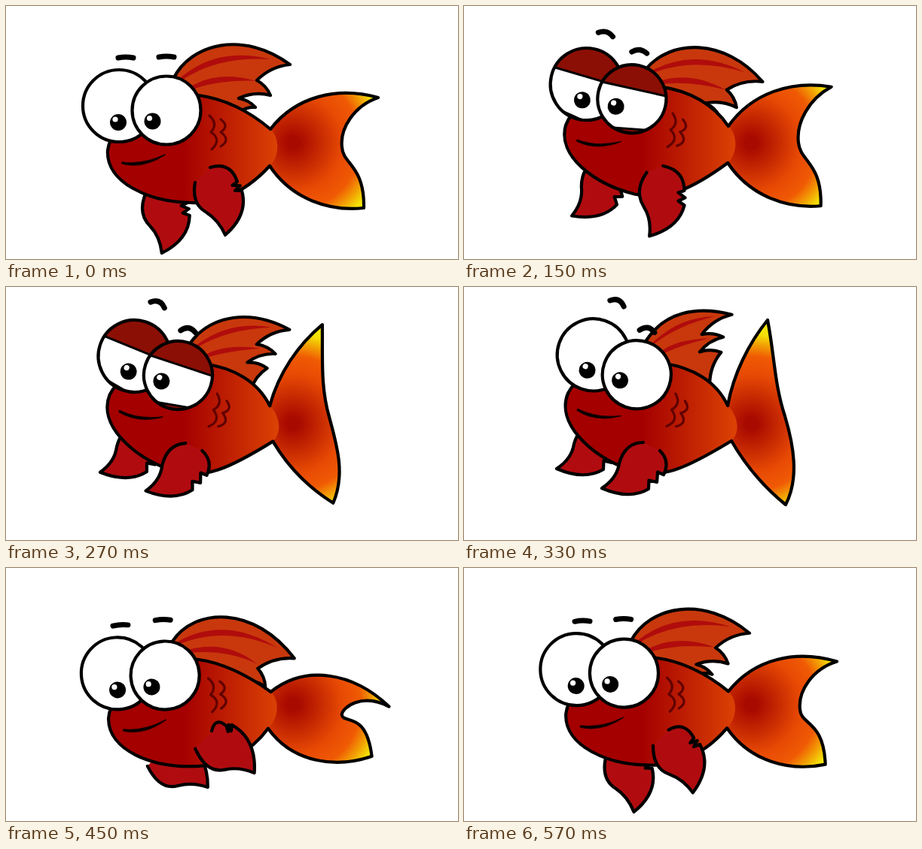
An HTML page for the animation above (600 ms loop, 600 by 337 pixels).

```html
<!DOCTYPE html>
<html lang="en">
<head>
<meta charset="utf-8">
<title>Swimming fish</title>
<style>
  html, body { margin: 0; width: 100%; height: 100%; overflow: hidden; background: #fff; }
  svg { display: block; width: 100%; height: 100%; }
  .ink { stroke: #000; stroke-width: 4.2; stroke-linejoin: round; stroke-linecap: round; }
  .line { fill: none; }
  .fin { fill: #b00c10; }
  .brow { fill: none; stroke-width: 7; }
  .lid { fill: #8c0f05; }
  .lid-edge { fill: none; stroke: #000; stroke-width: 3; }
</style>
</head>
<body>
<svg viewBox="0 0 600 337" preserveAspectRatio="xMidYMid meet">
  <defs>
    <linearGradient id="bodyFill" gradientUnits="userSpaceOnUse" x1="236" x2="362" y1="0" y2="0">
      <stop offset="0" stop-color="#a40000"/>
      <stop offset="1" stop-color="#dc4204"/>
    </linearGradient>
    <radialGradient id="tailFill" gradientUnits="userSpaceOnUse" cx="381" cy="182" r="140">
      <stop offset=".06" stop-color="#a80a00"/>
      <stop offset=".47" stop-color="#e84a04"/>
      <stop offset=".64" stop-color="#f05a04"/>
      <stop offset=".76" stop-color="#f2a304"/>
      <stop offset=".85" stop-color="#f4e008"/>
      <stop offset="1" stop-color="#f5f008"/>
    </radialGradient>
  </defs>
  <path id="backFin" class="ink fin"/>
  <g class="turning">
    <path id="dorsal" class="ink" fill="#c8380c"/>
    <path id="stripes" fill="#b00c0c"/>
  </g>
  <path id="tail" class="ink" fill="url(#tailFill)"/>
  <path id="bodyShape" fill="url(#bodyFill)"/>
  <path id="bodyLine" class="ink line"/>
  <path id="frontFin" class="ink fin"/>
  <g id="head" class="turning">
    <path d="M270 146Q282 157 272 168Q287 178 273 191M285 151Q297 160 285 168Q299 178 285 187"
      fill="none" stroke="#600000" stroke-width="3.2" stroke-linecap="round" stroke-linejoin="round"/>
    <path d="M154 208Q182 212 211 198Q182 217 154 210Z" stroke="#1a0000" stroke-width="1.5" stroke-linejoin="round"/>
  </g>
  <path id="leftBrow" class="ink brow"/>
  <path id="rightBrow" class="ink brow"/>
</svg>
<script>
const LOOP = 600, STEP = 30;
const KEY_TIMES = [0, 90, 210, 330, 390, 450, 570];

// How far each part has moved from rest (0) to its folded pose (1).
const motion = {
  lift:     [0, .386, .86, 1, .27, -.16, -.045],
  tailTop:  [0, -.21, .55, 1, -.18, -.52, -.02],
  tailLow:  [0, -.35, .56, 1, .15, -.39, -.16],
  crest:    [0, -.1, .19, 1, -.04, -.5, -.11],
  frontFin: [0, -.06, .89, 1, .01, -.52, -.14],
  backFin:  [.22, .58, .92, 1, .1, -.56, .03]
};

// Rest and folded outlines, relative to the pivot of each part.
const tail = {
  topRest:   [0,-24, 34,-68, 89,-81, 143,-66, 111,-55, 92,-25, 95,0],
  topFolded: [-1,-24, 7,-67, 27,-107, 52,-138, 61,-92, 61,-52, 75,-10],
  lowRest:   [96,23, 125,24, 124,81, 79,86, 29,70, -1,25],
  lowFolded: [87,30, 94,73, 76,108, 49,86, 24,58, 4,23]
};
const dorsal = {
  rest:   [-25,-29, -2,-76, 68,-94, 130,-48, 86,-27, 104,-7, 62,-3, 84,9, 65,14],
  folded: [-38,-30, -28,-79, 12,-100, 59,-104, 30,-66, 58,-72, 35,-43, 62,-52, 62,-6]
};
const fin = {
  rest:   [4,-26, 31,-34, 40,-7, 46,5, 55,37, 24,64, 15,44, -1,34, -21,23, -16,-6],
  folded: [1,-11, 15,3, 6,21, -14,40, -39,55, -76,39, -56,26, -53,6, -45,-22, -21,-22]
};
const body = {
  back: [325,142, 292,124, 256,119],
  face: [215,112, 140,150, 135,192, 132,235, 190,261, 245,262],
  belly: [285,263, 320,246]
};

// upper and lower: heights of the crossing lid edges at x = -60 and x = 60
const eyes = [
  { x: 150, y: 133, r: 48, pupil: [-1, 22], upper: [24, 32], lower: [12, 37] },
  { x: 213, y: 139, r: 45.5, pupil: [-18.5, 14.5], upper: [24, 24], lower: [27, 9] }
];
const brows = [
  { id: 'leftBrow', x: 159, y: 69, dx: 44, dy: -47, turn: 24 },
  { id: 'rightBrow', x: 213, y: 68, dx: 30, dy: -9, turn: 9 }
];
const HEAD_TURN = 19.2, HEAD_X = 287, HEAD_Y = 176;

const el = id => document.getElementById(id);
const draw = (id, d) => el(id).setAttribute('d', d);
const mix = (a, b, k) => a + (b - a) * k;
const clamp = v => Math.min(1, Math.max(0, v));

const SIZES = { M: 2, L: 2, Q: 4, C: 6 };
function path(commands, nums) {
  let i = 0;
  return [...commands].map(c => c + nums.slice(i, i += SIZES[c]).map(n => n.toFixed(2)).join(' ')).join('');
}

const mapPoints = (nums, fn) =>
  nums.flatMap((x, i) => i % 2 ? [] : fn(x, nums[i + 1], i));
const shift = (nums, dx, dy) => mapPoints(nums, (x, y) => [x + dx, y + dy]);
function rotate(nums, degrees, cx = 0, cy = 0) {
  const a = degrees * Math.PI / 180, c = Math.cos(a), s = Math.sin(a);
  return mapPoints(nums, (x, y) => [cx + (x - cx) * c - (y - cy) * s, cy + (x - cx) * s + (y - cy) * c]);
}

// Swings every point around the pivot; beyond rest only the angle goes on.
function swing(rest, folded, k) {
  return mapPoints(rest, (x, y, i) => {
    const from = Math.atan2(y, x);
    let turn = Math.atan2(folded[i + 1], folded[i]) - from;
    turn = Math.atan2(Math.sin(turn), Math.cos(turn));
    const r = mix(Math.hypot(x, y), Math.hypot(folded[i], folded[i + 1]), Math.max(0, k));
    return [r * Math.cos(from + turn * k), r * Math.sin(from + turn * k)];
  });
}

// Smooth cyclic interpolation without overshoot.
function sample(keys, t) {
  const n = keys.length;
  const wrap = i => (i + n) % n;
  const span = i => (KEY_TIMES[i + 1] ?? LOOP) - KEY_TIMES[i];
  const slope = i => (keys[wrap(i + 1)] - keys[i]) / span(i);
  const tangent = i => {
    const a = slope(wrap(i - 1)), b = slope(i);
    return a * b > 0 ? 2 * a * b / (a + b) : 0;
  };
  const i = KEY_TIMES.findLastIndex(time => time <= t), next = wrap(i + 1);
  const k = (t - KEY_TIMES[i]) / span(i);
  return mix(keys[i], keys[next], k * k * (3 - 2 * k)) +
    span(i) * k * (1 - k) * ((1 - k) * tangent(i) - k * tangent(next));
}

function drawFin(id, k, x, y) {
  const p = shift(swing(fin.rest, fin.folded, k), x, y);
  const [px, py, qx, qy] = p.slice(4, 8);
  const dx = qx - px, dy = qy - py, len = Math.hypot(dx, dy);
  const notch = (along, depth) => [px + dx * along - dy / len * depth, py + dy * along + dx / len * depth];
  draw(id, path('MQLLLLQQQ',
    [...p.slice(0, 6), ...notch(.12, 8), ...notch(.48, -1), ...notch(.7, 8), ...p.slice(6)]));
}

function drawDorsal(k) {
  const p = shift(swing(dorsal.rest, dorsal.folded, k), 247, 126);
  let d = path('MC', p.slice(0, 8));
  for (let i = 6, side = -1; i < p.length - 2; i += 2, side = -side) {
    const [x, y, nx, ny] = p.slice(i, i + 4);
    const bend = .18 * side;
    d += path('Q', [(x + nx) / 2 + (ny - y) * bend, (y + ny) / 2 - (nx - x) * bend, nx, ny]);
  }
  draw('dorsal', d + 'L270 137');

  const [x, y, ax, ay, bx, by] = p;
  const tipAt = (turn, scale) =>
    rotate(p.slice(6, 8), turn, 247, 126).map((v, i) => mix([247, 126][i], v, scale));
  const cx = (ax + bx) / 2, cy = (ay + by) / 2;
  const crescent = (sx, sy, drop, tip) =>
    path('MQQ', [sx, sy, cx, cy + drop, ...tip, cx, cy + drop + 13, sx, sy + 4]) + 'Z';
  draw('stripes', crescent(x + 8, y, 12, tipAt(-7.5, .85)) + crescent(x + 20, y + 12, 44, tipAt(3, .64)));
}

function drawTailAndBody(top, low, lift) {
  const pivot = [351, 188 - 6 * lift];
  const upper = shift(swing(tail.topRest, tail.topFolded, top), ...pivot);
  const lower = shift(swing(tail.lowRest, tail.lowFolded, low), ...pivot);
  draw('tail', path('MCCCC', [...upper, ...lower]));

  const [x1, y1] = upper, [x2, y2] = lower.slice(-2);
  const line = path('MCCCC', [
    x1, y1,
    ...shift(body.back, 10 * lift, -17 * lift),
    ...rotate(body.face, HEAD_TURN * lift, HEAD_X, HEAD_Y),
    ...shift(body.belly, -24 * lift, -5 * lift),
    x2, y2
  ]);
  draw('bodyLine', line);
  draw('bodyShape', line + path('C', [x2 + 13, y2 - 12, x1 + 13, y1 + 12, x1, y1]));
}

const lid = ([left, right], side) =>
  `<g class="${side}"><path class="lid" d="M-60 ${left}L60 ${right}V${side === 'up' ? -120 : 120}H-60Z"/></g>`;
const lidEdge = ([left, right], side) =>
  `<g class="${side}"><path class="lid-edge" d="M-60 ${left}L60 ${right}"/></g>`;

eyes.forEach(({ x, y, r, pupil: [px, py], upper, lower }, i) => {
  el('head').insertAdjacentHTML('beforeend', `
    <g transform="translate(${x} ${y})">
      <clipPath id="eye${i}"><circle r="${r}"/></clipPath>
      <circle r="${r}" fill="#fff"/>
      <circle cx="${px}" cy="${py}" r="11"/>
      <circle cx="${px - 4}" cy="${py - 4}" r="3.6" fill="#fff"/>
      <g class="lids" clip-path="url(#eye${i})">
        ${lid(upper, 'up')}${lid(lower, 'down')}
        ${lidEdge(upper, 'up')}${lidEdge(lower, 'down')}
      </g>
      <circle r="${r}" class="ink line"/>
    </g>`);
});

const setAll = (selector, name, value) =>
  document.querySelectorAll(selector).forEach(node => node.setAttribute(name, value));

function setLids(closed) {
  setAll('.lids', 'display', closed ? 'inline' : 'none');
  setAll('.up', 'transform', `translate(0 ${-75 * (1 - closed)})`);
  setAll('.down', 'transform', `translate(0 ${45 * (1 - closed)})`);
}

function render(t) {
  const at = name => sample(motion[name], t);
  const lift = at('lift');

  drawTailAndBody(at('tailTop'), at('tailLow'), lift);
  drawDorsal(at('crest'));
  drawFin('frontFin', at('frontFin'), 267 - 8 * lift, 241 - 12 * lift);
  drawFin('backFin', at('backFin'), 204 - 5 * lift, 257 - 54 * lift);
  setAll('.turning', 'transform', `rotate(${HEAD_TURN * lift} ${HEAD_X} ${HEAD_Y})`);
  for (const { id, x, y, dx, dy, turn } of brows) {
    draw(id, `M-10 0Q0 ${-2 - 8 * Math.max(0, lift)} 10 0`);
    el(id).setAttribute('transform', `translate(${x + dx * lift} ${y + dy * lift}) rotate(${turn * lift})`);
  }
  setLids(clamp((75 - Math.abs(t - 210)) / 30));
}

const start = performance.now();
function tick() {
  const t = (performance.now() - start) % LOOP;
  render(Math.floor(t / STEP) * STEP);
  requestAnimationFrame(tick);
}
tick();
</script>
</body>
</html>
```
